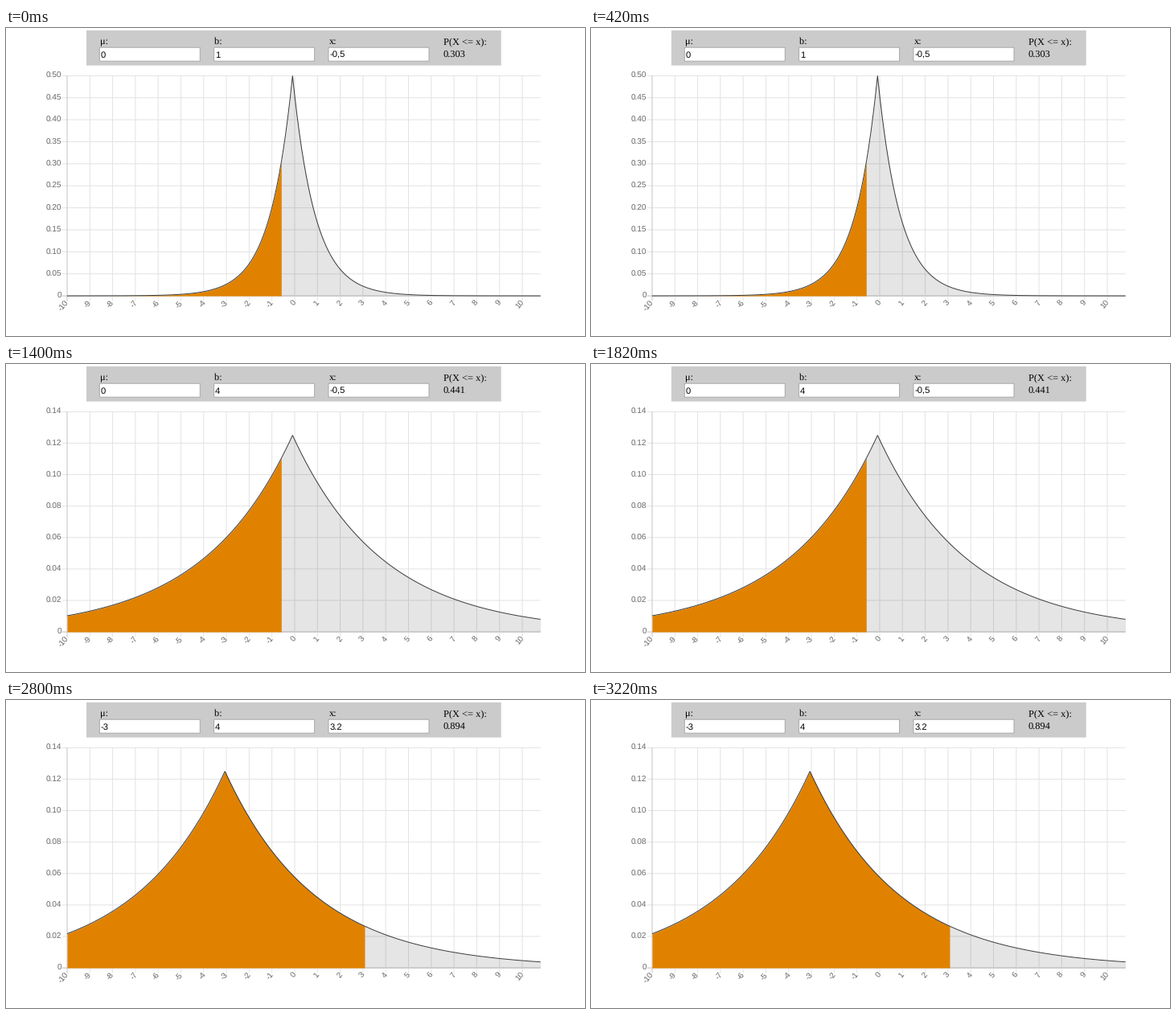
Recreate the animation shown at these times as a matplotlib script. Size 720 by 383 pixels, loop 3.5 s.

```python
import numpy as np
import matplotlib.pyplot as plt
from matplotlib.animation import FuncAnimation
from matplotlib.patches import Rectangle

W, H, DPI = 720, 383, 100
LEFT, RIGHT, TOP, BASE = 76, 664.7, 59.3, 333.1
GRID_STEP = 28.3
PT = 72 / DPI

# mu, b, x as typed, axis maximum, tick step
STATES = [
    (0, 1, "-0,5", 0.50, 0.05),
    (0, 2, "-0,5", 0.25, 0.05),
    (0, 4, "-0,5", 0.14, 0.02),
    (-3, 4, "-0,5", 0.14, 0.02),
    (-3, 4, "3.2", 0.14, 0.02),
]

plt.rcParams["text.hinting"] = "none"
fig = plt.figure(figsize=(W / DPI, H / DPI), dpi=DPI, facecolor="white")
ax = fig.add_axes([0, 0, 1, 1])


def density(x, mu, b):
    return np.exp(-np.abs(x - mu) / b) / (2 * b)


def cumulative(x, mu, b):
    tail = 0.5 * np.exp(-abs(x - mu) / b)
    return tail if x < mu else 1 - tail


def to_px(x):
    return LEFT + (x + 10) * (RIGHT - LEFT) / 21


def write(x, y, s, size, font="Liberation Sans", color="black", **kw):
    ax.text(x, y, s, fontsize=size * PT, family=font, color=color, **kw)


def line(xs, ys, color, z=1):
    ax.plot(xs, ys, color=color, lw=PT, zorder=z, snap=False,
            solid_capstyle="butt", solid_joinstyle="miter")


def box(x, y, w, h, face, edge="none"):
    ax.add_patch(Rectangle((x, y), w, h, facecolor=face, edgecolor=edge,
                           lw=PT, zorder=1, snap=False))


def draw_form(mu, b, typed, prob):
    box(100, 3, 515.7, 43.6, "#cbcbcb")
    fields = [(117, "μ:", str(mu)), (259.3, "b:", str(b)), (401.7, "x:", typed)]
    for x, label, value in fields:
        write(x, 20, label, 12.4, "Liberation Serif")
        box(x - 0.7, 24.2, 125, 17, "white", "#a9a9a9")
        write(x + 0.9, 36.8, value, 11.2)
    write(544, 20, "P(X <= x):", 12.4, "Liberation Serif")
    write(544, 37.3, f"{prob:.3f}", 12.4, "Liberation Serif")


def draw_grid(top, step):
    for i in range(int(top / step + 0.5) + 1):
        y = BASE - i * step / top * (BASE - TOP)
        line([70, RIGHT], [y, y], "#bfbfbf" if i == 0 else "#e3e3e3")
        write(69, y + 3.1, f"{i * step:.2f}" if i else "0", 10,
              color="#666666", ha="right")
    for i in range(21):
        x = LEFT + i * GRID_STEP
        line([x, x], [TOP, 339.5], "#c4c4c4" if i == 0 else "#e3e3e3")
        write(x + 1, 340, str(i - 10), 10, color="#666666", rotation=50,
              rotation_mode="anchor", ha="right", va="center")


def draw_curve(mu, b, limit, top):
    def height(x):
        return BASE - density(x, mu, b) / top * (BASE - TOP)

    def area(start, end, **style):
        x = np.linspace(start, end, 400)
        ax.fill_between(to_px(x), height(x), BASE, lw=0, zorder=2, **style)

    area(-10, limit, color="#e08200")
    area(limit, 11, color="black", alpha=0.1)
    x = np.linspace(-10, 11, 211)
    line(to_px(x), height(x), "#3c3c3c", 3)


def draw(i):
    mu, b, typed, top, step = STATES[i]
    limit = float(typed.replace(",", "."))
    ax.clear()
    ax.set(xlim=(0, W), ylim=(H, 0))
    ax.axis("off")
    draw_form(mu, b, typed, cumulative(limit, mu, b))
    draw_grid(top, step)
    draw_curve(mu, b, limit, top)
    return []


anim = FuncAnimation(fig, draw, frames=len(STATES), interval=700,
                     repeat=True, repeat_delay=0)
plt.show()
```
